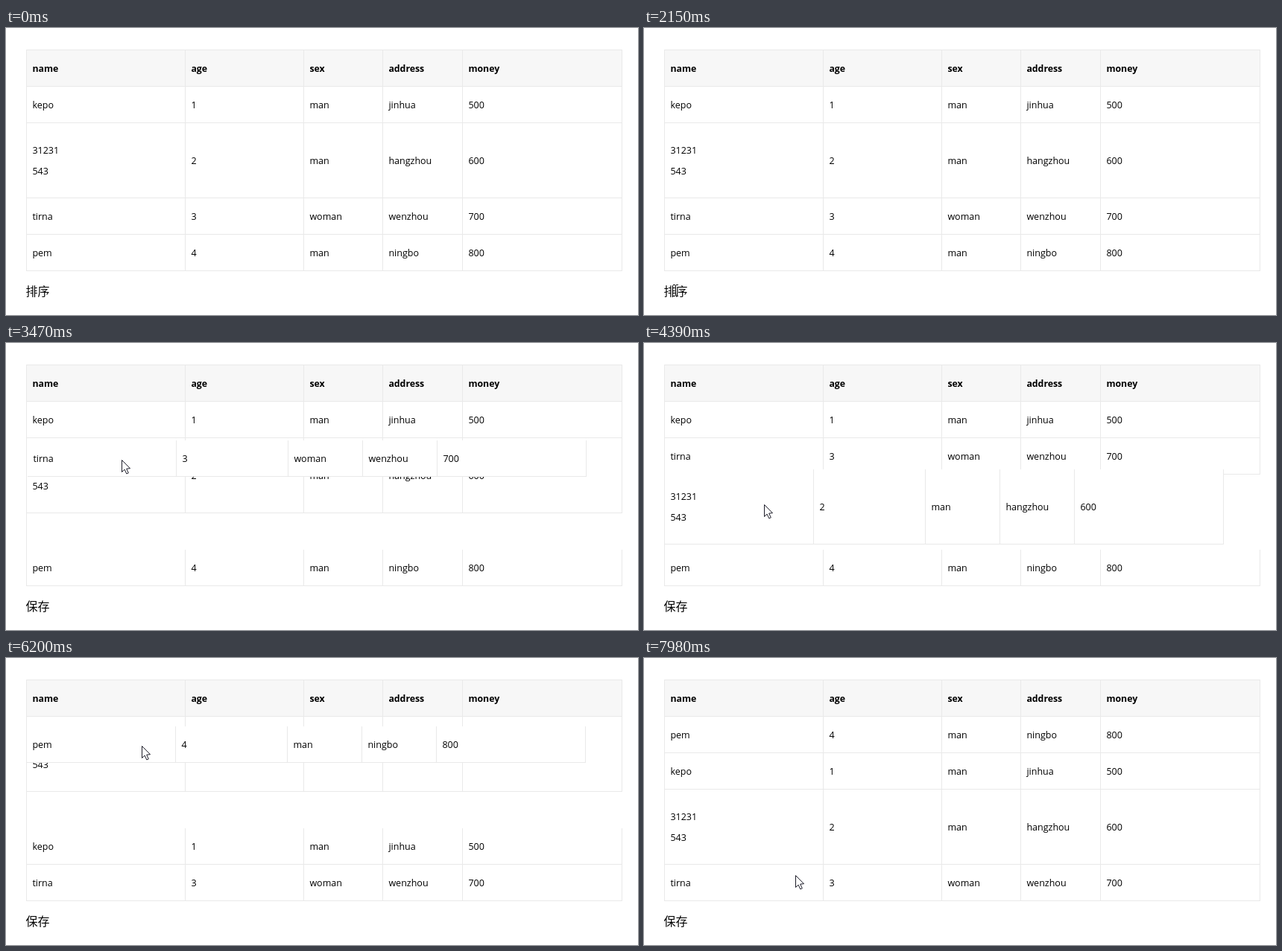
These frames come from a looping animation (848 px wide and 386 px high, 8 s). An HTML page with a canvas:

```html
<!DOCTYPE html>
<html lang="zh-CN">
<head>
<meta charset="utf-8">
<title>Sortable table</title>
<style>
html, body { margin: 0; width: 100%; height: 100%; overflow: hidden; background: #fff; }
canvas { display: block; }
</style>
</head>
<body>
<canvas id="stage" width="848" height="386"></canvas>
<script>
const ctx = document.getElementById('stage').getContext('2d');
const LOOP = 8000;
const ENTER = 260;
const TICK = 78;
const LEFT = 28;
const TOP = 79;
const ROW_H = 49;
const LINE = '#e9e9e9';
const LATIN = '"Open Sans", "Noto Sans", sans-serif';
const CJK = '"Noto Sans CJK SC", "Noto Sans CJK", sans-serif';

const HEAD = ['name', 'age', 'sex', 'address', 'money'];
const ROWS = [
  ['kepo', '1', 'man', 'jinhua', '500'],
  ['31231\n543', '2', 'man', 'hangzhou', '600'],
  ['tirna', '3', 'woman', 'wenzhou', '700'],
  ['pem', '4', 'man', 'ningbo', '800']
];
const WIDE = [213, 159, 106, 107, 214];
const NARROW = [200, 150, 100, 100, 200];

// Pointer moves; those with a row drag it and let go at the drop time
const START = { x: 598, y: 376 };
const MOVES = [
  { from: 250, to: 1050, x: 110, y: 211 },
  { from: 1060, to: 1280, x: 90, y: 173 },
  { from: 1280, to: 1680, x: 22, y: 300 },
  { from: 1680, to: 2130, x: 42, y: 353 },
  { from: 2400, to: 2900, x: 154, y: 255 },
  { from: 3010, to: 3540, x: 155, y: 150, row: 2, drop: 3920 },
  { from: 3920, to: 4180, x: 161, y: 224 },
  { from: 4325, to: 4825, x: 162, y: 83, row: 1, drop: 5170 },
  { from: 5110, to: 5330, x: 162, y: 161 },
  { from: 5330, to: 5640, x: 182, y: 304 },
  { from: 5745, to: 6322, x: 182, y: 88, row: 3, drop: 6650 },
  { from: 6650, to: 7080, x: 197, y: 167 },
  { from: 7130, to: 7545, x: 203, y: 292, row: 1, drop: 7970 }
];

const rowHeight = id => ROWS[id][0].includes('\n') ? 101 : ROW_H;
const ease = u => u * u * (3 - 2 * u);

function rowTop(order, id) {
  let y = TOP;
  for (const other of order) {
    if (other === id) return y;
    y += rowHeight(other);
  }
}

function along(i, t) {
  const a = MOVES[i - 1] || START, b = MOVES[i];
  const k = ease(Math.min(1, Math.max(0, (t - b.from) / (b.to - b.from))));
  return { x: Math.round(a.x + (b.x - a.x) * k), y: Math.round(a.y + (b.y - a.y) * k) };
}

function pointerAt(t) {
  const next = MOVES.findIndex(m => m.from > t);
  return along((next < 0 ? MOVES.length : next) - 1, t);
}

// A neighbour gives way once the pointer nears its far edge
function reorder(order, id, y) {
  const swap = i => order.splice(i, 2, order[i + 1], order[i]);
  for (let pass = 0; pass < order.length; pass++) {
    const i = order.indexOf(id);
    const prev = order[i - 1], next = order[i + 1];
    if (prev !== undefined && y < rowTop(order, prev) + ROW_H / 2) swap(i - 1);
    else if (next !== undefined && y > rowTop(order, next) + rowHeight(next) - ROW_H / 2) swap(i);
    else return;
  }
}

function sceneAt(t) {
  const order = [0, 1, 2, 3];
  let held = null;
  MOVES.forEach((m, i) => {
    if (m.row === undefined || t < m.from) return;
    const grab = MOVES[i - 1];
    const p = along(i, t);
    const top = rowTop(order, m.row);
    if (t < m.drop) held = { id: m.row, x: LEFT + p.x - grab.x, y: top + p.y - grab.y };
    reorder(order, m.row, p.y);
  });
  return { order, held };
}

function rect(x, y, w, h, color) {
  ctx.fillStyle = color;
  ctx.fillRect(x, y, w, h);
}

function text(str, x, y, font) {
  ctx.font = font;
  ctx.fillStyle = '#000';
  ctx.fillText(str, x, y);
}

function drawRow(cells, x, y, h, widths, bold) {
  const font = bold ? `bold 12.3px ${LATIN}` : `12.5px ${LATIN}`;
  const total = widths.reduce((a, b) => a + b);
  rect(x, y, total, h, bold ? '#f7f7f7' : '#fff');
  rect(x, y + h - 1, total, 1, LINE);
  for (const [i, cell] of cells.entries()) {
    const lines = cell.split('\n');
    const base = y + (h - 1) / 2 + 5 - (lines.length - 1) * 14;
    lines.forEach((line, n) => text(line, x + 7.4, base + n * 28, font));
    x += widths[i];
    rect(x - 1, y, 1, h, LINE);
  }
}

function drawArrow(x, y) {
  const shape = [[0, 0], [0, 16], [3.6, 12.6], [6.3, 18.4], [8.8, 17.3], [6.2, 11.6], [11, 11.2]];
  ctx.beginPath();
  shape.forEach(([dx, dy]) => ctx.lineTo(x + dx + 0.5, y + dy + 0.5));
  ctx.closePath();
  ctx.fillStyle = '#fff';
  ctx.fill();
  ctx.lineWidth = 1;
  ctx.strokeStyle = '#1c1c28';
  ctx.stroke();
}

function drawBeam(x, y) {
  rect(x, y - 7, 1, 14, '#000');
  for (const dy of [-8, 7]) {
    rect(x - 3, y + dy, 3, 1, '#000');
    rect(x + 1, y + dy, 3, 1, '#000');
  }
}

function draw(t) {
  const { order, held } = sceneAt(t);

  rect(0, 0, 848, 386, '#fff');
  drawRow(HEAD, LEFT, TOP - ROW_H, ROW_H, WIDE, true);
  for (const id of order) {
    if (held && held.id === id) continue;
    drawRow(ROWS[id], LEFT, rowTop(order, id), rowHeight(id), WIDE);
  }
  rect(27, 29, 800, 1, LINE);
  rect(27, 29, 1, 298, LINE);
  text(t < 2280 ? '排序' : '保存', 26.5, 360, `16px ${CJK}`);

  if (t < ENTER) return;
  if (held) drawRow(ROWS[held.id], held.x, held.y, rowHeight(held.id), NARROW);
  const { x, y } = pointerAt(t);
  const overLabel = x >= 26 && x <= 59 && y > 338;
  (overLabel ? drawBeam : drawArrow)(x, y);
}

// The picture refreshes on a steady tick
const snap = t => ENTER + TICK * Math.floor((t + 12 - ENTER) / TICK);

const origin = performance.now();
function tick() {
  draw(snap((performance.now() - origin) % LOOP));
  requestAnimationFrame(tick);
}
tick();
</script>
</body>
</html>
```
